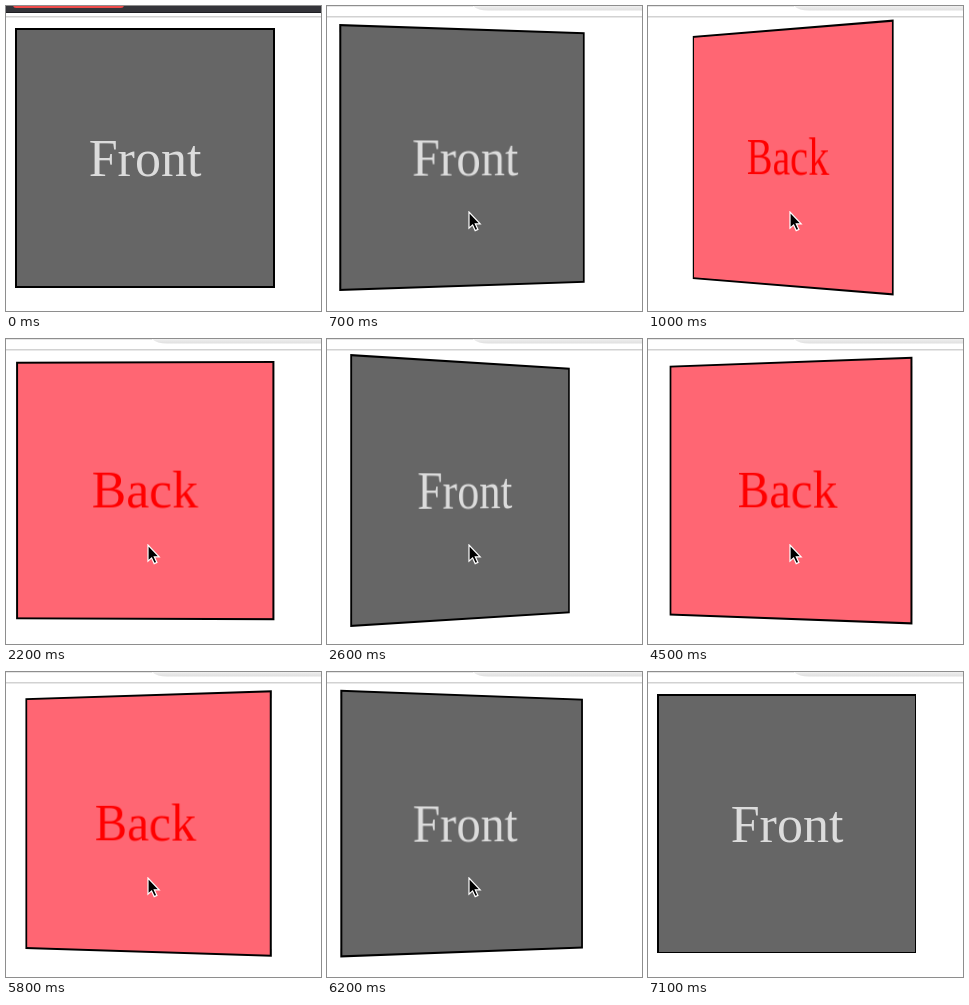
An HTML page with a canvas that plays this animation: 315x305 px, repeating every 7.5 s.

```html
<!DOCTYPE html>
<html lang="en">
<head>
<meta charset="utf-8">
<title>Flip card</title>
<style>
html, body { margin: 0; width: 100%; height: 100%; overflow: hidden; background: #fff; }
#stage { position: relative; width: 315px; height: 305px; overflow: hidden; background: #fff; }
#bar, #cursor { position: absolute; left: 0; top: 0; }
#page { position: absolute; left: 0; top: 12px; width: 315px; height: 293px; overflow: hidden; }
.face {
  position: absolute; left: 9px; top: 10px; width: 260px; height: 260px;
  box-sizing: border-box; border: 2px solid #000;
  font: 52px "Liberation Serif", "Times New Roman", serif;
  text-align: center; white-space: nowrap;
}
#front { background: #666; color: #dcdcdc; line-height: 258px; }
#back { background: #ff6673; color: #f00; line-height: 255px; }
#front.settled { width: 259px; height: 259px; border-width: 2px 1px 1px 2px; }
</style>
</head>
<body>
<div id="stage">
  <canvas id="bar" width="315" height="12"></canvas>
  <div id="page">
    <div id="front" class="face">Front</div>
    <div id="back" class="face">Back</div>
  </div>
  <svg id="cursor" width="16" height="22" viewBox="0 0 16 22">
    <path d="M1 1V17.2L4.6 13.9L7.2 19.6L9.9 18.4L7.3 12.8H12.2Z" fill="#000" stroke="#fff" stroke-width="1.2"/>
  </svg>
</div>
<script>
const LOOP = 7500, STEP = 100, FLIP = 800;
const CLICKS = [616, 2184, 4017, 5718];
const $ = id => document.getElementById(id);
const front = $("front"), back = $("back"), cursor = $("cursor");
const ctx = $("bar").getContext("2d");

const bezier = (a, b, s) => 3 * a * s * (1 - s) ** 2 + 3 * b * s * s * (1 - s) + s ** 3;

// CSS "ease": cubic-bezier(.25, .1, .25, 1)
function ease(x) {
  if (x <= 0 || x >= 1) return x <= 0 ? 0 : 1;
  let lo = 0, hi = 1;
  for (let i = 0; i < 30; i++) {
    const mid = (lo + hi) / 2;
    if (bezier(.25, .25, mid) < x) lo = mid; else hi = mid;
  }
  return bezier(.1, 1, lo);
}

// Each click reverses the flip
const angleAt = t => 180 * CLICKS.reduce(
  (sum, start, i) => sum + (i % 2 ? -1 : 1) * ease((t - start) / FLIP), 0);

function drawBar(dark) {
  const rect = (color, x, y, w, h) => { ctx.fillStyle = color; ctx.fillRect(x, y, w, h); };
  rect("#fff", 0, 0, 315, 12);
  if (dark) {
    rect("#35353a", 0, 0, 315, 6);
    rect("#1f1f23", 0, 6, 315, 1);
    ctx.fillStyle = "#f04a4a";
    ctx.beginPath();
    ctx.roundRect(7, -6, 111, 8, 3);
    ctx.fill();
  } else {
    rect("#e6e6e6", 0, 0, 146, 1);
    const shade = ctx.createLinearGradient(0, 0, 0, 5);
    shade.addColorStop(0, "#efefef");
    shade.addColorStop(1, "#dedede");
    ctx.fillStyle = shade;
    ctx.beginPath();
    ctx.moveTo(146, 0);
    ctx.quadraticCurveTo(151, 4.6, 161, 4.6);
    ctx.lineTo(315, 4.6);
    ctx.lineTo(315, 0);
    ctx.fill();
  }
  rect("#d2d2d2", 0, 10, 315, 1.5);
}

function drawCard(t) {
  const angle = angleAt(t), showBack = angle > 90;
  const still = angle < 0.01;
  const turn = a => `translate(-.15px, -.45px) scale(.994) perspective(1300px) rotateY(${a}deg)`;
  front.style.display = showBack ? "none" : "block";
  back.style.display = showBack ? "block" : "none";
  front.style.transform = still ? "none" : turn(angle);
  front.classList.toggle("settled", still && t > CLICKS[0]);
  back.style.transform = turn(angle - 180);
}

function drawCursor(t) {
  const p = Math.max(0, (t - 6500) / 500);
  const k = p * p * (3 - 2 * p);
  cursor.style.display = t >= 300 && t < 7100 ? "block" : "none";
  cursor.style.transform = `translate(${141 - 87 * k}px, ${205 - 199 * k}px)`;
}

function frame() {
  const t = Math.floor(performance.now() % LOOP / STEP) * STEP;
  drawBar(t < 700);
  drawCard(t);
  drawCursor(t);
  requestAnimationFrame(frame);
}
frame();
</script>
</body>
</html>
```
